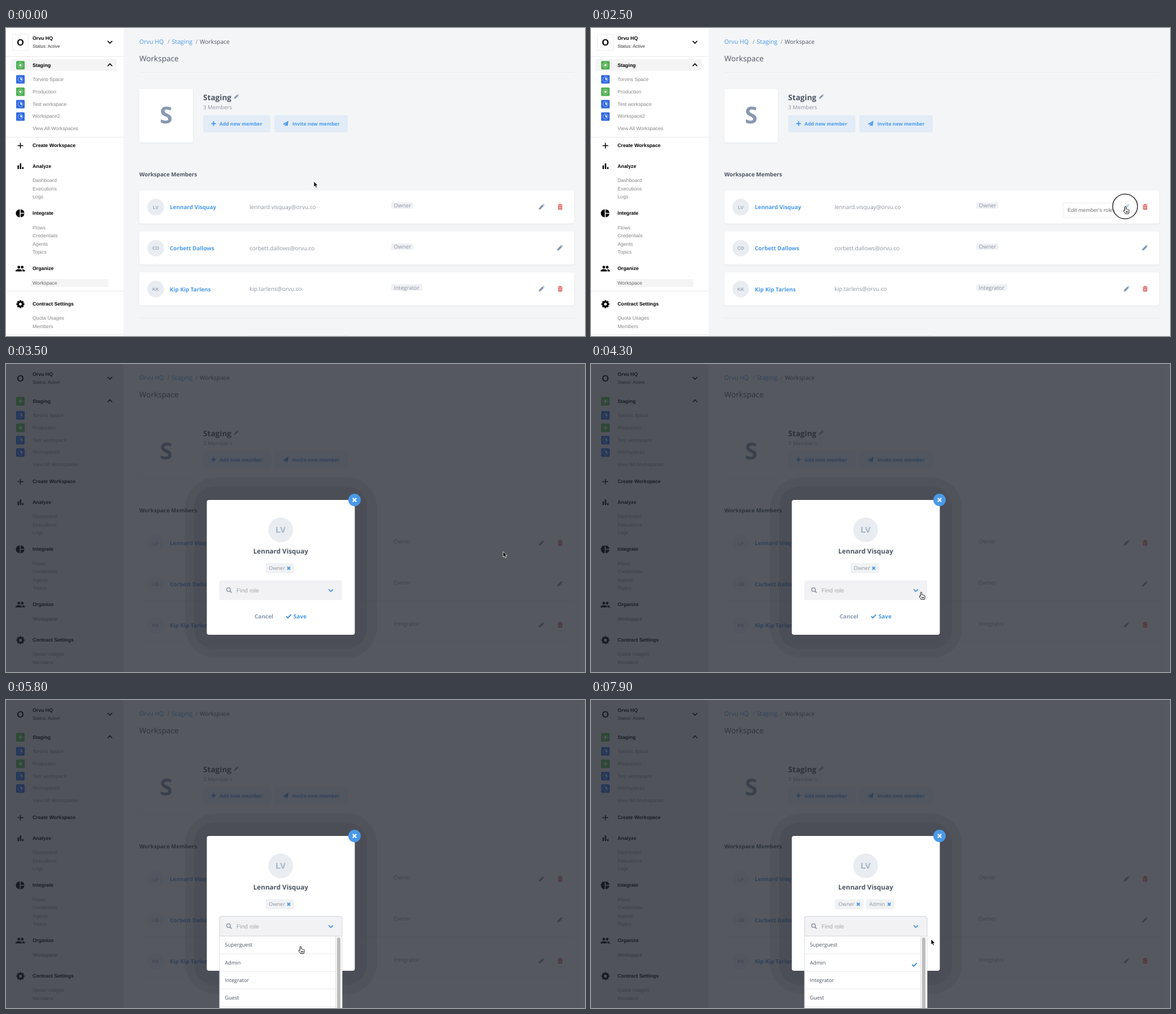
An HTML page that plays this animation: 1025 px wide and 546 px high, repeating every 8 s.

```html
<!DOCTYPE html>
<html lang="en">
<head>
<meta charset="utf-8">
<title>Workspace members</title>
<style>
  html, body { margin: 0; width: 100%; height: 100%; overflow: hidden; background: #f4f5f7; }
  svg { display: block; width: 100vw; height: 100vh; }
  text { text-rendering: geometricPrecision; white-space: pre; }
  .ui { font-family: "Open Sans", "Noto Sans", sans-serif; }
  .nav { font-family: "Liberation Sans", Arial, sans-serif; }
  .b { font-weight: 700; }
  .mid { text-anchor: middle; }
  /* Under the overlay the page surfaces flatten into each other */
  .dim .card { fill: #f4f5f7; }
  .dim .side { fill: #e0e0e4; }
  .dim .faint { opacity: 0; }
</style>
</head>
<body>
<svg id="stage" viewBox="0 0 1025 546" xmlns="http://www.w3.org/2000/svg"></svg>
<script>
const LOOP = 8000, STEP = 100;
const BLUE = '#4a99e9', SLATE = '#8798b0', GREY = '#8e949e', INK = '#4d5562', RED = '#dc5b57';

// ---- drawing helpers ----
const rect = (x, y, w, h, fill, r = 0, extra = '') =>
  `<rect x="${x}" y="${y}" width="${w}" height="${h}" rx="${r}" fill="${fill}" ${extra}/>`;
const disc = (x, y, r, fill, extra = '') => `<circle cx="${x}" cy="${y}" r="${r}" fill="${fill}" ${extra}/>`;
const text = (x, y, str, size, fill, cls = 'ui') =>
  `<text x="${x}" y="${y}" font-size="${size}" fill="${fill}" class="${cls}">${str}</text>`;
const shape = (x, y, d, fill, extra = '') => `<path transform="translate(${x} ${y})" d="${d}" fill="${fill}" ${extra}/>`;
const line = (x, y, d, color, width) => shape(x, y, d, 'none', `stroke="${color}" stroke-width="${width}"`);
const rule = (x, y, w, color) => rect(x, y, w, 1, color);
const group = (id, body) => `<g id="${id}">${body}</g>`;
const faint = body => `<g class="faint">${body}</g>`;
const card = (x, y, w, h, r) => rect(x, y, w, h, '#fff', r, 'class="card" filter="url(#soft)"');

// ---- icons, centred on x, y ----
const pencil = (x, y, color = SLATE, scale = 1) =>
  `<g transform="translate(${x} ${y}) scale(${scale})" fill="${color}">
    <path d="M-4.9 4.9L-4.2 1.7 1.6-4.1 4.1-1.6-1.7 4.2zM2.3-4.7Q3.1-5.4 3.9-4.7L4.7-3.9Q5.4-3.1 4.7-2.3z"/></g>`;
const trash = (x, y) => shape(x, y,
  'M-4.3-3.8H-2L-1.4-5H1.4L2-3.8H4.3V-2.7H-4.3zM-3.6-2.1H3.6V4Q3.6 5 2.6 5H-2.6Q-3.6 5-3.6 4z', RED) +
  line(x, y, 'M-1.7-.8V3.6M0-.8V3.6M1.7-.8V3.6', '#fff', .7);
const plus = (x, y, r, color, width) => line(x, y, `M${-r} 0H${r}M0 ${-r}V${r}`, color, width);
const cross = (x, y, r, color, width) => line(x, y, `M${-r} ${-r}L${r} ${r}M${r} ${-r}L${-r} ${r}`, color, width);
const chevron = (x, y, dir, color, width = 1.7) => line(x, y, `M-4 ${-2 * dir}L0 ${2 * dir}L4 ${-2 * dir}`, color, width);
const tick = (x, y) => line(x, y, 'M-4.2 .2L-1.4 3L4.2-2.8', BLUE, 2.2);
const spaceIcon = (y, live) => rect(18, y - 7.5, 15, 15, live ? '#4caf50' : '#2f69dd', 1.5) +
  disc(25.5, y, 4.4, 'none', `stroke="${live ? '#a5d9a7' : '#9dbcf5'}" stroke-width="1"`) +
  (live ? disc(25.5, y, 2.1, '#fff') : shape(25.5, y, 'M0-3V0L2 2A3 3 0 0 0 0-3z', '#fff'));

function gear(x, y) {
  let teeth = '';
  for (let a = 0; a < 360; a += 45) teeth += `<rect x="-1.7" y="-7" width="3.4" height="4" rx=".6" transform="rotate(${a})"/>`;
  return `<g transform="translate(${x} ${y})">${teeth}<circle r="3.9" fill="none" stroke="#000" stroke-width="2.8"/></g>`;
}

// ---- page ----
function sidebar() {
  const head = (y, str) => text(47, y, str, 8.75, '#000', 'nav b');
  const item = (y, str) => text(47, y, str, 8.75, '#858585', 'nav');
  const items = (ys, names) => names.map((n, i) => item(ys[i], n)).join('');
  return rect(0, 0, 208, 546, '#fff', 0, 'class="side"') +
    faint(rect(11.5, 11.5, 28, 28, '#fff', 1, 'stroke="#ececec"') +
      [50, 193, 466, 543].map(y => rule(0, y, 208, '#e9e9e9')).join('') +
      rect(8, 55, 188, 21, '#f4f4f5', 1) + rect(44, 445, 137, 14, '#f4f4f5')) +
    text(25.5, 31, 'O', 16, '#000', 'nav b mid') +
    head(20.5, 'Orvu HQ') + text(47, 34.5, 'Status: Active', 8, '#333', 'nav') + chevron(184, 25, 1, '#000') +
    head(68.5, 'Staging') + chevron(184, 65.5, -1, '#000') +
    [66, 91, 113, 135, 157].map((y, i) => spaceIcon(y, i === 0 || i === 2)).join('') +
    items([94, 115.8, 137.5, 159.3, 181], ['Torvins Space', 'Production', 'Test workspace', 'Workspace2', 'View All Workspaces']) +
    plus(25.5, 208.5, 5, '#000', 1.5) + head(211, 'Create Workspace') +
    rect(20.5, 243.5, 2.4, 6.5, '#000') + rect(24.5, 240, 2.4, 10, '#000') + rect(28.5, 246.5, 2.4, 3.5, '#000') +
    head(248, 'Analyze') + items([273.2, 288, 302.3], ['Dashboard', 'Executions', 'Logs']) +
    shape(25, 328.5, 'M-.6-7V7A7 7 0 0 1-.6-7zM.9-7A7 7 0 0 1 7.6-.8H.9zM.9 .8H7.6A7 7 0 0 1 .9 7z', '#000') +
    head(331.3, 'Integrate') + items([356.5, 371.2, 385.8, 400.2], ['Flows', 'Credentials', 'Agents', 'Topics']) +
    disc(22.7, 424, 2.4, '#000') + disc(28.7, 424, 2.4, '#000') +
    shape(25, 431.5, 'M-8 0V-1.5Q-7-4-2.3-4T3.2-1.5V0zM4.4 0V-1.6Q4-3 3-3.8 7.4-4 8.5-1.5V0z', '#000') +
    head(429.3, 'Organize') + text(47, 454.8, 'Workspace', 8.75, '#666', 'nav') +
    gear(25.5, 489.5) + head(491.8, 'Contract Settings') + items([517.2, 531.8], ['Quota Usages', 'Members']);
}

function memberRow(y, initials, name, mail, role, removable) {
  const c = y + 29.5;
  return card(236, y, 770, 58.5, 4) +
    disc(265, c, 14.7, '#e9edf2') + text(265, c + 3, initials, 8.3, '#9aa8bb', 'nav b mid') +
    text(290, c + 3.7, name, 9.9, BLUE, 'ui b') + text(431, c + 3.3, mail, 10, GREY) +
    faint(rect(682, c - 8.5, role === 'Owner' ? 39 : 55, 11.5, '#eff1f5', 2.5)) + text(686.5, c + .8, role, 9.75, GREY) +
    (removable ? pencil(948, c - .5) + trash(981, c - .5) : pencil(980.5, c - .5));
}

function page() {
  const button = (x, w, tx, label) => rect(x, 154.5, w, 30.5, '#e2ecf7', 3) + text(tx, 172.7, label, 8.6, BLUE, 'ui b');
  return rect(0, 0, 1025, 546, '#f4f5f7') + sidebar() +
    text(236, 28.2, 'Orvu HQ', 10.6, BLUE) + text(286, 28.2, '/', 10.6, GREY) +
    text(293.5, 28.2, 'Staging', 10.7, BLUE) + text(335.5, 28.2, '/', 10.6, GREY) + text(343, 28.2, 'Workspace', 10.3, INK) +
    text(236, 59, 'Workspace', 13.6, INK) +
    faint(rule(236, 78, 770, '#eaecef') + rule(236, 514, 770, '#eaecef') + rule(425, 545, 180, '#eaebee')) +
    card(236, 108, 95, 95, 3) + text(283.5, 168.5, 'S', 41, SLATE, 'ui b mid') +
    text(349, 128, 'Staging', 13.6, INK, 'ui b') + pencil(407.8, 121.5, SLATE, .85) +
    text(349, 144, '3 Members', 9.7, GREY) +
    button(349, 119, 378, 'Add new member') + plus(367.5, 169.5, 4, BLUE, 2) +
    button(475, 130, 507, 'Invite new member') +
    shape(495, 169.5, 'M5-5L3.6 4.2.4 3-1.4 5V2.3L3.2-2.8-2.4 2-5 .8z', BLUE) +
    text(236, 262.7, 'Workspace Members', 9.8, INK, 'ui b') +
    memberRow(288, 'LV', 'Lennard Visquay', 'lennard.visquay@orvu.co', 'Owner', true) +
    memberRow(360.7, 'CD', 'Corbett Dallows', 'corbett.dallows@orvu.co', 'Owner', false) +
    memberRow(433.3, 'KK', 'Kip Kip Tarlens', 'kip.tarlens@orvu.co', 'Integrator', true) +
    group('hover', pencil(948, 317, BLUE));
}

// ---- dialog ----
function chip(x, label) {
  return rect(x, 353, 50.5, 18, '#f1f2f5', 2.5) + text(x + 6, 365.3, label, 9.1, GREY) + cross(x + 41.2, 362, 2.5, BLUE, 2);
}

function dialog() {
  const rows = ['Superguest', 'Admin', 'Integrator', 'Guest'];
  const shade = 'rgba(20,24,32,.07)';
  return rect(0, 0, 1025, 546, 'rgba(32,37,45,.75)') +
    rect(317, 201, 340, 320, shade, 55) + rect(333, 217, 306, 288, shade, 36) +
    rect(355.5, 241, 262, 239, '#fff', 4) +
    disc(617, 241, 11, BLUE) + cross(617, 241, 3.2, '#fff', 2.2) +
    disc(486.3, 294, 22, '#e9edf2') + text(486.3, 299, 'LV', 14.7, '#a3b0c2', 'nav b mid') +
    text(486.3, 336, 'Lennard Visquay', 11.7, INK, 'ui b mid') +
    group('oneRole', chip(459.3, 'Owner')) +
    group('twoRoles', chip(432, 'Owner') + chip(486.7, 'Admin')) +
    rect(377.5, 383.5, 217.5, 35, '#f2f2f4', 3) +
    disc(394, 400, 3.3, 'none', `stroke="${GREY}" stroke-width="1.5"`) + line(394, 400, 'M2.4 2.4L5.4 5.4', GREY, 1.8) +
    text(408, 404.6, 'Find role', 10.3, '#a4a6aa', 'nav') + chevron(575, 401.3, 1, BLUE) +
    text(440, 451, 'Cancel', 10, SLATE, 'ui b') + tick(500.3, 447) + text(509, 451, 'Save', 10, BLUE, 'ui b') +
    group('focus', shape(0, 0, 'M378 418V387Q378 383.5 381.5 383.5H591.5Q595 383.5 595 387V418', 'none', 'stroke="#cfd4da"')) +
    group('list', rect(378, 418.5, 217, 140, '#fff', 0, 'stroke="#d4d7dc"') +
      rows.map((r, i) => text(387.5, 437.3 + 31.2 * i, r, 9.2, INK) + rule(378.5, 449.5 + 31.2 * i, 205, '#e8e9eb')).join('') +
      rect(583, 419, 12, 130, '#f7f7f7') + rule(583, 418, 12, '#ddd') + rect(583, 419, 1, 130, '#e2e2e2') +
      rect(586, 421, 6, 130, '#bdbdbd', 3)) +
    group('checked', tick(572.7, 469));
}

const tooltip = rect(836, 310, 100, 26, '#fff', 1.5, 'stroke="#ececee"') + text(843.5, 326.2, "Edit member's roles", 9.65, '#777', 'nav');
const arrow = shape(0, 0, 'M0 0V9.8L2.2 7.7 3.7 11.2 5.5 10.4 4 7.1H7z', '#000', 'stroke="#fff" stroke-width=".8"');
const hand = shape(0, 0,
  'M-1.2 7V1Q-1.2 0 0 0T1.2 1V4.6Q2.4 4 3.1 5 4.3 4.6 4.9 5.6 6.6 5.4 6.6 7V9Q6.6 10.5 5.6 12.8H-.2Q-.9 11-2.9 8.6-3.8 7.2-2.8 6.6T-1.2 7.6zM1.2 8.2V10.8M2.7 8.2V10.8M4.2 8.2V10.8',
  '#fff', 'stroke="#000" stroke-width=".9" stroke-linejoin="round"');

document.getElementById('stage').innerHTML = `<defs>
    <filter id="soft" x="-10%" y="-10%" width="120%" height="130%"><feDropShadow dx="0" dy=".8" stdDeviation="1.2" flood-color="#1c2a40" flood-opacity=".09"/></filter>
  </defs>` + group('page', page()) + group('dialog', dialog()) + group('tip', tooltip) +
  '<circle id="ring" fill="#fff" fill-opacity=".55" stroke="#111" stroke-width="1.3"/>' +
  group('cursor', group('arrow', arrow) + group('hand', hand));

// ---- motion ----
const el = id => document.getElementById(id);
const show = (id, on) => el(id).setAttribute('visibility', on ? 'visible' : 'hidden');
const ease = u => u * u * (3 - 2 * u);
const ramp = (t, a, b) => Math.min(1, Math.max(0, (t - a) / (b - a)));

// Cursor moves: start, end, x, y
const moves = [
  [0, 950, 943, 326], [950, 1300, 946, 316.5], [3200, 4300, 584.5, 404.5],
  [4300, 4650, 573.5, 400.5], [5400, 6150, 479, 466.5], [6800, 7650, 582, 446], [7650, 7900, 602, 424]
];
const hands = [[1000, 2700], [4200, 7650]];
// Clicks: start, end, x, y, radius
const clicks = [[1500, 1800, 945, 315.5, 15.3], [2500, 2700, 945.5, 316.3, 22], [4700, 4900, 574, 401, 22], [6300, 6500, 479, 466.5, 22]];
const during = (t, [a, b]) => t >= a && t < b;

function render(t) {
  let x = 545, y = 272;
  for (const [a, b, tx, ty] of moves) {
    const u = ease(ramp(t, a, b));
    x += (tx - x) * u;
    y += (ty - y) * u;
  }
  el('cursor').setAttribute('transform', `translate(${x} ${y})`);
  const pointing = hands.some(h => during(t, h));
  show('hand', pointing);
  show('arrow', !pointing);

  const click = clicks.find(c => during(t, c));
  show('ring', click);
  if (click) ['cx', 'cy', 'r'].forEach((k, i) => el('ring').setAttribute(k, click[i + 2]));

  show('hover', during(t, [1100, 2700]));
  el('tip').setAttribute('opacity', ramp(t, 1700, 2150) * (1 - ramp(t, 2700, 3000)));

  const modal = t >= 2700, picked = t >= 6500;
  el('page').setAttribute('class', modal ? 'dim' : '');
  show('dialog', modal);
  const parts = { oneRole: !picked, twoRoles: picked, checked: picked, list: t >= 4900, focus: t >= 5200 };
  for (const id in parts) show(id, modal && parts[id]);
}

const start = performance.now();
function frame() {
  const t = (performance.now() - start) % LOOP;
  render(Math.floor(t / STEP) * STEP);
  requestAnimationFrame(frame);
}
frame();
</script>
</body>
</html>
```
